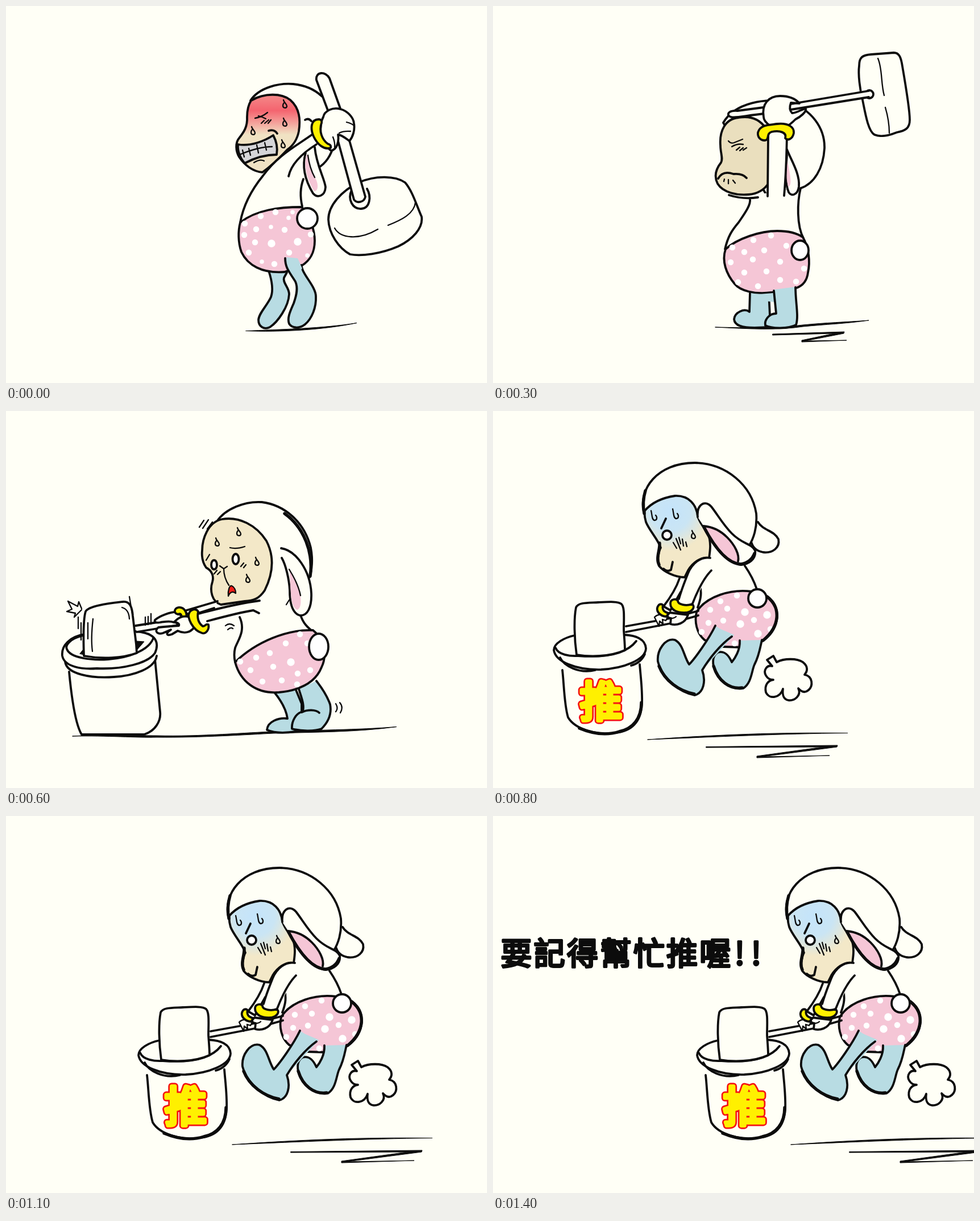
Write an HTML page that moves like this. It is 846x662 px and loops after 3400 ms.

```html
<!DOCTYPE html>
<html lang="zh-Hant">
<head>
<meta charset="utf-8">
<title>Push</title>
<style>
html, body { margin: 0; width: 100%; height: 100%; overflow: hidden; background: #fffff6; }
svg { display: block; width: 100vw; height: 100vh; }
path, circle, ellipse { fill: none; stroke: #0c0c0c; stroke-width: 3.8; stroke-linecap: round; stroke-linejoin: round; }
.paper { fill: #fffff6; }
.white { fill: #fff; }
.skin { fill: #f3e8c8; }
.tan { fill: #eadfbe; }
.red { fill: url(#flush); }
.cold { fill: url(#chill); }
.gray { fill: #d5d5d8; }
.pink { fill: #f5c6d6; }
.blue { fill: #b8dce3; }
.yellow { fill: #fff000; }
.bare { stroke: none; }
.thin { stroke-width: 2.3; }
.heavy { stroke-width: 5.4; }
.taper { fill: #0c0c0c; stroke-width: 1; }
.dots { stroke: #fff; stroke-width: 10.5; }
.dots.small { stroke-width: 7.5; }
.dots.big { stroke-width: 13.5; }
text { font-family: "Noto Sans CJK TC", "Noto Sans CJK", sans-serif; font-weight: 400; stroke-linejoin: round; }
.push { font-size: 74px; text-anchor: middle; fill: #fff000; stroke: #fff000; stroke-width: 7; }
.push.rim { stroke: #f51414; stroke-width: 12.5; }
.say { font-size: 55px; letter-spacing: 3.3px; fill: #0c0c0c; stroke: #0c0c0c; stroke-width: 3.8; }

/* Hard steps: 100 ms is 2.941 % of the loop */
.pose, .say { visibility: hidden; }
.pose, .say, .swing, .hit { animation: 3400ms step-end infinite; }
#strain { animation-name: strain; }
#strain .swing { animation-name: heave; transform-origin: 585px 207px; }
#lift { animation-name: lift; }
#lift .swing { animation-name: raise; transform-origin: 505px 180px; }
#pound { animation-name: pound; }
#pound .swing { animation-name: smash; transform-origin: 440px 345px; }
#pound .hit { animation-name: hit; }
#drag { animation-name: drag; }
.say { animation-name: say; }
@keyframes strain {
  0% { visibility: visible; transform: none; }
  2.9411% { visibility: visible; transform: translate(-25px, 0); }
  5.8823%, 100% { visibility: hidden; }
}
@keyframes heave { 0% { transform: none; } 2.9411%, 100% { transform: rotate(-12deg); } }
@keyframes lift {
  0% { visibility: hidden; }
  5.8823% { visibility: visible; transform: translate(-15px, 9px); }
  8.8235% { visibility: visible; transform: none; }
  14.7058%, 100% { visibility: hidden; }
}
@keyframes raise { 0% { transform: rotate(22deg); } 8.8235%, 100% { transform: none; } }
@keyframes pound {
  0% { visibility: hidden; }
  14.7058% { visibility: visible; }
  23.5294%, 100% { visibility: hidden; }
}
@keyframes smash { 0% { transform: rotate(50deg); } 17.647%, 100% { transform: none; } }
@keyframes hit { 0% { opacity: 0; } 17.647%, 100% { opacity: 1; } }
@keyframes drag {
  0% { visibility: hidden; transform: none; }
  23.5294% { visibility: visible; transform: none; }
  26.4705% { visibility: visible; transform: translate(42px, 0); }
  29.4117% { visibility: visible; transform: translate(84px, 0); }
  32.3529% { visibility: visible; transform: translate(126px, 0); }
  35.2941% { visibility: visible; transform: translate(168px, 0); }
  38.2352% { visibility: visible; transform: translate(210px, 0); }
  41.1764%, 100% { visibility: visible; transform: translate(252px, 0); }
}
@keyframes say { 0% { visibility: hidden; } 41.1764%, 100% { visibility: visible; } }
</style>
</head>
<body>
<svg viewBox="0 0 846 662">
<defs>
  <linearGradient id="flush" gradientUnits="userSpaceOnUse" x1="0" y1="155" x2="0" y2="226">
    <stop offset="0" stop-color="#f48b8a"/><stop offset=".4" stop-color="#f4646f"/>
    <stop offset=".7" stop-color="#f4a09a"/><stop offset="1" stop-color="#f0e2c3"/>
  </linearGradient>
  <radialGradient id="chill" gradientUnits="userSpaceOnUse" cx="312" cy="176" r="70">
    <stop offset="0" stop-color="#c4e4fb"/><stop offset=".5" stop-color="#cae5f4"/>
    <stop offset="1" stop-color="#f3e8c8"/>
  </radialGradient>
  <path id="drop" class="thin" d="M-2-7C-1-2 4 0 4 4C4 8-3 8-3 3Q-3 0-1-2"/>
  <path id="drip" class="thin" d="M-5-9C-3-2-4 7 1 8C6 8 6 2 3-1"/>
</defs>

<g id="strain" class="pose">
  <path class="taper" d="M422 570.5C480 568 560 566 617 556.5C560 569 480 573 422 570.5z"/>
  <path class="blue" d="M462 465C467 480 471 497 466 511C460 525 445 539 444 551C444 563 454 569 464 564C478 555 497 528 498 506C498 494 486 486 489 477L494 468"/>
  <!-- hood -->
  <path class="paper" d="M430 166C445 143 480 135 505 137C525 139 543 147 555 158C585 175 580 220 576 245C572 262 562 277 549 284L500 290z"/>
  <path d="M526 200Q532 196 537 202"/>
  <path class="red" d="M431 166C455 152 485 153 500 165C517 180 518 200 515 220C512 235 505 245 495 252C480 268 465 282 451 292C435 291 420 280 410 265C404 255 403 240 410 232C418 222 425 212 424 195C424 185 426 174 431 166z"/>
  <path class="thin" d="M460 187Q450 195 438 197M444 193Q452 195 457 198M449 206l5-5M455 206l7-6M461 206l5-6"/>
  <path d="M462 219Q472 216 477 224"/>
  <path class="gray" d="M408 243C430 247 455 237 470 227C476 238 478 250 476 261C455 261 435 268 420 276C412 268 407 255 408 243z"/>
  <path class="thin" d="M411 261C430 253 450 247 468 247M416 253l3 12M427 250l3 12M441 244l3 14M455 240l3 13M436 275Q447 268 454 272"/>
  <use href="#drop" x="490" y="172"/><use href="#drop" x="490" y="204"/>
  <use href="#drop" x="434" y="219"/><use href="#drop" x="487" y="242"/>
  <!-- trunk and arm -->
  <path class="paper bare" d="M538 225C510 246 478 262 452 298C430 325 417 352 412 380C440 358 480 353 521 352C517 335 517 320 523 303L527 262L546 243z"/>
  <path d="M538 226C510 246 478 262 452 298C430 325 417 352 412 380M546 243C522 258 502 276 497 299M523 304C517 320 517 335 521 352"/>
  <path class="paper" d="M527 258C520 282 526 306 540 329C548 338 561 334 562 318C560 302 546 280 543 248"/>
  <path class="pink bare" d="M528 262C523 282 530 306 542 325C549 326 550 314 545 304C535 290 533 276 531 262z"/>
  <path class="thin" d="M531 262C533 278 537 290 543 301"/>
  <path class="pink" d="M412 380C440 358 480 353 520 353C535 368 543 395 543 412C543 436 533 448 520 456L490 467C450 470 425 455 414 432C408 415 408 395 412 380z"/>
  <path class="dots" d="M474 362h0M448 369h0M420 382h0M440 392h0M490 393h0M419 402h0M438 415h0M427 433h0M498 433h0M472 453h0M536 401h0"/>
  <path class="dots small" d="M497 372h0M466 388h0M450 449h0M530 438h0M504 362h0"/>
  <path class="dots big" d="M467 417h0M513 414h0"/>
  <path class="blue" d="M491 443C491 460 499 468 509 484C514 495 511 508 506 522C500 536 494 548 498 558C503 566 516 567 526 559C538 549 546 529 545 510C545 495 528 478 522 464L519 455"/>
  <path class="blue bare" d="M493 441L513 443L521 461L505 474z"/>
  <circle class="white" cx="530" cy="373" r="18"/>
  <g class="swing">
    <path class="paper" d="M567 375C567 350 590 325 620 310C650 297 685 298 702 310C715 325 722 350 731 370C734 390 715 410 690 422C660 435 625 440 605 436C585 425 568 400 567 375z"/>
    <path class="thin" d="M578 390C588 408 620 412 654 392M672 385C695 376 718 365 720 345"/>
    <path class="paper" d="M608 323C600 340 610 357 625 356C640 355 643 335 635 321"/>
    <path class="paper" d="M546 130C544 115 562 114 569 127L588 180L632 335C630 345 617 347 612 340L578 215z"/>
  </g>
  <path class="paper" d="M558 195C560 184 575 177 588 181C600 184 611 195 612 206C614 218 610 230 604 237C597 232 590 226 584 226C586 238 582 252 572 254C565 250 555 235 553 225C553 212 555 200 558 195z"/>
  <path class="thin" d="M599 204Q607 206 611 209M606 220Q594 219 586 223M575 230Q579 240 578 248"/>
  <path class="yellow" d="M550 199C536 199 535 215 541 229C548 244 560 253 571 249C572 245 570 243 566 242C556 235 550 220 555 205C556 201 553 199 550 199z"/>
</g>

<g id="lift" class="pose">
  <path class="taper" d="M391 564C450 565 500 566 545 560C585 556 620 555 661 552C620 558 585 559 545 563C500 570 450 567 391 564z"/>
  <path class="taper" d="M492 576L618 572L617 575L550 588L622 587L543 590V587L600 575L492 578z"/>
  <path class="blue" d="M452 503L451 537C442 530 425 538 424 550C425 562 440 565 460 565L488 564L485 503"/>
  <path class="paper" d="M405 205C425 170 480 160 520 170C560 180 584 215 583 250C581 285 565 312 541 320L480 330z"/>
  <path class="paper bare" d="M450 334C454 350 435 375 420 392Q412 405 408 427L547 408C530 385 534 345 541 318z"/>
  <path d="M415 332Q440 340 466 336M452 339C454 350 440 368 432 380C420 394 413 405 408 427M541 320C535 345 534 385 546 408"/>
  <path class="tan" d="M400 245C398 220 408 198 432 196C455 192 470 200 480 215C490 240 490 290 484 312C478 322 465 330 450 331C430 333 405 328 395 312C388 298 393 285 401 275C405 268 400 258 400 245z"/>
  <path class="thin" d="M414 237Q418 242 424 240L439 234M420 247Q430 241 440 243M428 253l6-5M434 254l6-5M440 253l6-4M407 304l-1 4M414 305v7M422 306l4 5"/>
  <path d="M396 303C402 292 412 291 423 295C434 294 442 297 446 302"/>
  <path class="paper" d="M517 252C525 272 540 295 538 317C536 332 525 335 520 327C513 310 515 285 517 262"/>
  <path class="pink bare" d="M518 272C515 290 516 305 519 317C525 316 525 306 518 272z"/>
  <path class="pink" d="M409 427C430 408 470 395 500 395C520 395 535 399 545 406C556 425 558 450 554 468C552 485 542 492 534 495L490 503C460 507 435 500 425 488C410 470 402 448 409 427z"/>
  <path class="dots" d="M421 424h0M458 411h0M489 403h0M442 432h0M477 429h0M516 421h0M418 450h0M457 445h0M505 449h0M442 468h0M481 466h0M547 461h0M431 485h0M466 492h0M505 481h0M533 484h0"/>
  <path class="blue bare" d="M455 507L494 504V498L533 493V510L495 520L455 515z"/>
  <path class="blue" d="M494 500L498 540C485 540 477 552 479 561C490 567 520 567 533 560C538 545 532 520 532 494"/>
  <ellipse class="white" cx="540" cy="429" rx="15" ry="17"/>
  <path class="paper bare" d="M484 225L483 342H512L517 220z"/>
  <path d="M484 228L483 334M517 222Q516 290 512 333"/>
  <g class="swing">
    <path class="paper" d="M644 105C644 90 650 86 665 85L705 82C714 82 717 90 719 100C725 135 733 180 733 200C733 215 725 219 710 222C695 228 680 230 671 226C660 220 655 190 650 165C645 145 642 120 644 105z"/>
    <path class="thin" d="M677 92C685 110 682 135 688 157M690 178C695 195 697 210 697 223"/>
    <circle class="paper" cx="662" cy="155" r="7"/>
    <path class="paper" d="M661 149L530 171L430 184C417 183 411 188 415 193C420 198 432 194 478 189L530 181L661 160"/>
  </g>
  <path class="paper" d="M476 195C472 172 485 158 505 158C520 158 532 163 539 171L524 170C521 178 522 184 526 188C535 188 545 180 550 180C552 186 540 195 532 199C528 203 520 210 515 212L487 210C480 205 476 200 476 195z"/>
  <path class="yellow" d="M466 222C470 208 485 209 500 207C520 205 530 213 529 223C527 234 518 237 514 232C517 222 505 218 490 221C480 224 487 235 478 236C470 236 465 230 466 222z"/>
</g>

<g id="pound" class="pose">
  <path class="taper" d="M117 571C180 567 230 570 265 570C340 572 430 564 470 563C540 560 620 560 687 554.5C620 564 540 564 470 566C430 568 340 574 265 573C230 574 180 570 117 571z"/>
  <path class="paper" d="M111 458C115 500 122 550 133 568Q185 568 243 568C262 562 273 545 271 528L262 436"/>
  <path class="paper" d="M104 440C106 462 150 470 190 467C225 465 262 452 265 430"/>
  <path class="paper" d="M139 392C112 396 97 412 99 430C103 450 135 454 160 452C205 454 250 443 262 425C272 402 258 389 228 387"/>
  <path d="M133 395C112 400 104 412 107 418C113 434 150 438 180 436C215 434 252 420 259 399"/>
  <path class="taper" d="M130 426l8-10v12zM229 404L243 405L230 420z"/>
  <!-- legs -->
  <path class="blue" d="M472 494C485 510 493 525 495 540C480 538 460 545 459 560C475 567 500 565 520 561L520 514L510 490"/>
  <path class="blue" d="M515 488C520 505 525 515 522 528C510 530 502 545 503 558C520 563 545 562 555 558C568 545 573 530 570 515C563 495 552 482 546 474"/>
  <path d="M520 529C530 524 545 524 551 530"/>
  <!-- hood and trunk -->
  <path class="paper bare" d="M425 330L411 362C420 378 414 392 405 412L403 441L543 387C528 375 522 365 518 355L500 300z"/>
  <path class="paper bare" d="M371 195C385 172 420 158 450 160C490 165 525 195 536 240C540 260 538 280 534 292L500 335L430 335z"/>
  <path d="M371 194C385 172 420 158 450 160C490 165 525 195 536 240C540 260 538 280 534 292M411 362C422 386 408 402 403 416Q400 428 403 441M518 358C522 372 530 380 543 390"/>
  <path class="heavy" d="M490 180C525 205 541 250 535 290"/>
  <path class="skin" d="M345 245C345 225 355 195 380 190C410 185 440 200 458 228C472 255 470 285 455 315C445 330 435 333 420 334L378 340C362 335 358 315 363 300C366 290 362 280 352 275C345 265 344 255 345 245z"/>
  <ellipse class="white" cx="366" cy="270" rx="5" ry="8"/>
  <ellipse class="white" cx="404" cy="260" rx="5.5" ry="9"/>
  <path class="thin" d="M352 262L358 252M394 240Q405 243 420 238M376 272L383 277L389 273M383 277C383 290 388 300 392 306M366 286l5-6M372 287l5-5M413 273l5-6M418 275l4-5"/>
  <path class="thin" style="fill:#f31d16" d="M391 325C390 315 393 306 397 307C402 309 404 315 404 320Q396 314 391 325z"/>
  <use href="#drop" x="371" y="230"/><use href="#drop" x="409" y="212"/>
  <use href="#drop" x="441" y="264"/><use href="#drop" x="425" y="294"/>
  <path class="paper" d="M484 241C510 245 535 280 537 320C538 345 530 360 517 359C503 355 499 335 499 315C498 295 492 270 485 258"/>
  <path class="pink bare" d="M498 277C502 310 498 345 513 349C520 345 519 330 517 318C513 305 506 290 498 277z"/>
  <path class="thin" d="M498 278C508 294 515 308 518 324M498 332l-5 8"/>
  <path class="pink" d="M403 441C440 405 495 383 540 385C560 400 565 430 555 450C545 475 520 490 480 494C440 497 412 475 403 441z"/>
  <path class="dots" d="M412 440h0M440 433h0M464 425h0M492 408h0M517 392h0M530 408h0M430 455h0M470 449h0M535 455h0M451 475h0M485 473h0M513 461h0M512 480h0"/>
  <path class="dots big" d="M501 441h0"/>
  <ellipse class="white" cx="550" cy="414" rx="17" ry="23"/>
  <g class="swing">
    <path class="paper" d="M137 430C136 400 136 365 140 352C145 342 180 338 205 335C218 333 222 345 223 360L229 410L230 425C205 434 170 436 137 430z"/>
    <path class="thin" d="M153 365Q149 400 152 422M144 372v28M204 345Q216 348 217 365"/>
    <path class="paper" d="M228 377L298 366L302 376L230 388"/>
    <path class="paper" d="M372 334L314 351L322 360L366 346"/>
    <path class="paper" d="M262 367C270 360 290 352 302 353L310 362L295 371C288 368 280 370 272 371C264 373 260 370 262 367z"/>
    <path class="yellow" d="M297 350C299 344 308 343 313 348Q319 355 317 361L309 361Q308 354 303 357Q296 356 297 350z"/>
    <path class="paper bare" d="M338 356C360 351 395 340 448 333L445 355L435 350C410 354 380 362 354 368z"/>
    <path d="M338 356C360 351 395 340 446 333M354 369C380 362 410 354 435 350L445 355"/>
    <path class="paper" d="M268 380C260 386 266 393 276 390L290 384C280 390 282 396 292 392L302 386C315 392 325 388 331 380L323 362C312 358 302 363 296 371Q306 372 304 377Q288 378 268 380z"/>
    <path class="yellow" d="M322 355C318 362 328 385 345 390C352 392 358 383 356 375C350 373 352 378 346 378C338 372 336 362 338 352C334 346 325 348 322 355z"/>
  </g>
  <path class="thin" d="M340 204l8-12M346 206l10-15M354 207l9-12M386 377Q393 371 401 377M390 384Q395 379 399 382M580 514q5 8 0 14M587 512q7 8 1 18"/>
  <path class="hit thin" d="M109 334L126 343L128 335L133 347M109 334L116 348L107 352L122 355L120 362L133 349M127 362v20M132 372v30M217 326L222 356M245 362v14M250 361v14M255 356v18"/>
</g>

<g id="drag" class="pose">
  <path class="taper" d="M272 577C400 568 500 564 624 565.5C500 567 400 572 272 577z"/>
  <path class="taper" d="M375 589.5L606 587L605 590L474 607L592 605L464 609V606L580 590L375 591z"/>
  <!-- mortar -->
  <path class="paper" d="M122 455C125 480 125 515 132 538C145 560 185 570 215 565C245 562 260 545 262 515C263 490 260 470 258 445"/>
  <path class="heavy" d="M152 557Q190 573 222 563C246 558 261 540 261 512"/>
  <path class="paper" d="M144 394C125 398 107 408 107 420C110 440 145 455 190 454C230 452 268 437 269 417C268 400 250 394 231 393"/>
  <path d="M110 416C115 428 135 431 150 430C190 433 232 430 252 404M118 433C125 448 152 462 180 455M267 427C262 438 254 444 243 447"/>
  <path class="paper" d="M147 428C143 400 142 365 146 345C150 336 165 337 185 336C205 335 220 334 226 339C232 345 230 365 230 385C231 400 232 410 232 420C205 432 170 432 147 428z"/>
  <text class="push rim" x="190" y="537">推</text>
  <text class="push" x="190" y="537">推</text>
  <!-- hood and trunk -->
  <path class="paper" d="M466 195C475 210 495 210 502 225C505 240 492 250 475 248C465 246 458 242 455 232"/>
  <path class="paper bare" d="M330 290C345 262 365 252 385 258L443 270C452 285 460 298 464 315C430 315 385 325 362 350L365 310z"/>
  <path d="M443 272C452 285 459 298 464 313M364 306C368 322 364 334 360 345"/>
  <path class="paper bare" d="M265 177C256 138 288 91 355 91C410 92 455 130 463 180C465 205 458 225 448 238L380 235z"/>
  <path d="M265 177C256 138 288 91 355 91C410 92 455 130 463 180C465 205 458 225 450 237"/>
  <path class="cold" d="M267 175C280 160 300 152 320 149C345 148 358 165 360 185C365 200 372 205 378 215C384 230 382 245 380 258C365 255 350 268 343 280L337 292C320 292 300 282 292 272C288 260 292 245 295 240C290 225 275 210 269 195C267 188 266 180 267 175z"/>
  <path class="heavy" d="M268 140Q262 160 266 180M293 232C294 244 286 258 292 270"/>
  <circle class="white" cx="306" cy="218" r="8"/>
  <path d="M296 206L304 189M300 277Q306 283 313 279L316 265"/>
  <path class="thin" d="M317 231l6 10M322 224l8 20M327 222l3 11M333 225l2 12M339 230l2 8"/>
  <use href="#drip" x="283" y="184" /><use href="#drip" x="321" y="181"/><use href="#drop" x="352" y="217"/>
  <path class="paper" d="M360 186C358 165 372 155 384 168C395 182 405 200 420 215C440 235 454 232 461 245C463 260 450 269 436 270C420 270 400 245 385 222C380 213 376 208 371 203"/>
  <path class="pink bare" d="M370 202C385 240 410 262 431 266C434 252 425 235 412 222C400 210 385 203 370 202z"/>
  <path d="M370 202C385 203 400 210 412 222C425 235 434 252 431 264"/>
  <path class="heavy" d="M371 204C390 240 412 268 436 269Q454 266 460 250"/>
  <!-- pants and legs -->
  <path class="pink" d="M358 353C375 325 420 312 455 317C485 318 501 340 500 362C496 395 470 412 440 415L405 414C390 410 380 406 372 402C358 390 354 370 358 353z"/>
  <path class="dots" d="M400 334h0M429 324h0M382 349h0M412 347h0M468 340h0M405 368h0M459 367h0M379 372h0M367 388h0M425 408h0M488 383h0"/>
  <path class="dots big" d="M443 353h0M482 358h0M435 374h0M466 391h0"/>
  <path class="heavy" d="M482 326C507 345 505 378 475 403"/>
  <path class="blue" d="M434 403C435 420 425 435 420 441C415 430 408 420 395 424C385 430 385 445 392 460C402 480 425 490 440 487C455 478 455 455 460 445C468 430 470 415 473 402"/>
  <path class="blue bare" d="M391 379L424 393L420 398L366 457L344 447z"/>
  <path class="blue" d="M391 377C380 400 355 435 345 445C335 430 335 410 320 402C303 398 288 420 290 440C298 470 330 495 355 499C370 495 375 475 368 455C380 435 400 410 420 396"/>
  <path class="heavy" d="M292 448C302 474 328 492 354 497M388 448C396 474 416 489 438 486"/>
  <circle class="white" cx="465" cy="329" r="16"/>
  <!-- handle, arms, hands -->
  <path class="paper" d="M234 378L312 364L361 351M234 388L312 373L361 359"/>
  <path class="paper" d="M328 294C322 312 310 330 300 343L312 350L330 318"/>
  <path class="paper thin" d="M284 362C290 356 300 356 308 360L304 368L298 366L299 374L293 369L292 378L287 368z"/>
  <path class="yellow" d="M290 343C286 350 292 360 305 361L309 355C300 353 297 348 299 341C296 338 292 339 290 343z"/>
  <path class="paper bare" d="M382 258C365 255 350 268 343 285L327 330L350 340L384 280z"/>
  <path d="M382 258C365 255 350 268 343 285C338 298 332 312 327 330M384 280C372 292 360 315 351 338"/>
  <path class="paper" d="M311 354C305 359 306 363 313 364L312 374C322 377 338 374 343 358z"/>
  <path class="thin" d="M313 364Q319 364 322 361"/>
  <path class="yellow" d="M312 338C312 330 322 329 325 333C325 340 340 343 350 339C356 343 352 352 340 354C325 355 312 350 312 338z"/>
  <path class="paper" d="M482 437L493 430L499 441C512 434 535 434 545 441C555 449 553 457 548 463C563 466 563 483 555 490C547 497 541 491 537 487C543 500 530 509 520 508C509 506 509 496 510 488C505 504 486 507 480 494C477 481 484 473 493 472C481 472 475 459 480 452Q484 446 491 448z"/>
</g>

<g class="say">
  <text x="13.5" y="261">要記得幫忙推喔</text>
  <text x="425 454" y="261">!!</text>
</g>
</svg>
</body>
</html>
```
